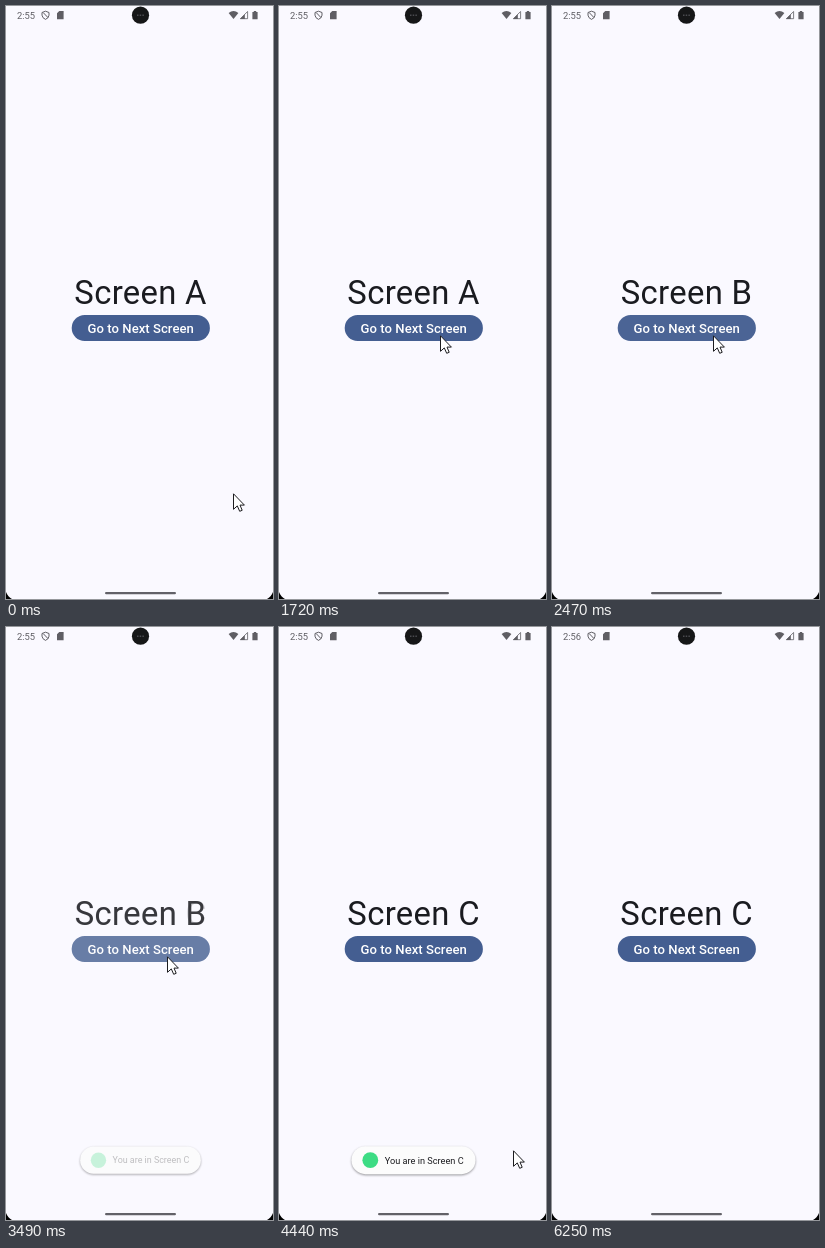
An HTML page that plays this animation: 267x593 px, repeating every 7000 ms.

```html
<!DOCTYPE html>
<html lang="en">
<head>
<meta charset="utf-8">
<title>Screen transitions</title>
<style>
  html, body { margin: 0; width: 100%; height: 100%; overflow: hidden; background: #faf9ff; }
  svg { display: block; width: 100vw; height: 100vh; font-family: Roboto, sans-serif; }
  .title { font-size: 32.8px; letter-spacing: .33px; fill: #1a1b20; text-anchor: middle; }
  .label { font-size: 13.12px; letter-spacing: .03px; font-weight: 500; fill: #fff; text-anchor: middle; }
  .button { x: 65.7px; y: 309px; width: 138.2px; height: 26.1px; rx: 13.05px; }
  #bubble { fill: #fcfcfc; filter: drop-shadow(0 1px 1px rgba(0, 0, 0, .4)); }
</style>
</head>
<body>
<svg viewBox="0 0 267 593">
  <rect width="267" height="593" fill="#faf9ff"/>

  <!-- status bar -->
  <g fill="#5f5e64">
    <text id="clock" x="11" y="12.9" font-size="9.4"></text>
    <path d="M39.5 5.2 L43 6.5 V9.2 Q42.8 12 39.5 13.4 Q36.2 12 36 9.2 V6.5Z M37.2 6.6 L42 11.6" fill="none" stroke="#5f5e64"/>
    <path d="M53.3 5 H57.6 V13.2 H51 V7.3Z"/>
    <path d="M222.6 6.9 Q227.5 3.2 232.4 6.9 L227.5 13Z"/>
    <path d="M234.4 12.7 L241.6 5.5 V12.7Z" fill="none" stroke="#5f5e64" stroke-width=".8"/>
    <path d="M234 13 L238.8 8.2 V13Z"/>
    <path d="M246.4 6 H247.8 V5 H250.2 V6 H251.6 V13.2 H246.4Z"/>
  </g>
  <circle cx="134.5" cy="9.2" r="8.6" fill="#161718"/>
  <path d="M131 9.2 H138" stroke="#4a4b4f" stroke-width="1.5" stroke-dasharray="1.5 1.2"/>

  <g id="screens"></g>

  <g id="toast">
    <rect id="bubble" x="72.5" y="519.2" width="124" height="28" rx="14"/>
    <g id="message">
      <circle cx="91.3" cy="533.2" r="7.9" fill="#3ddc84"/>
      <text x="105.8" y="536.6" font-size="9.18" fill="#1b1b1f">You are in Screen C</text>
    </g>
  </g>

  <!-- navigation handle and display corners -->
  <rect x="99" y="585.9" width="71" height="2.4" rx="1.2" fill="#626168"/>
  <path d="M0 586 Q2 591 6 593 H0Z M267 586 Q265 591 261 593 H267Z"/>

  <path id="cursor" d="M.5 .8 V16.3 L4.3 12.9 L6.7 18.3 L9.2 17.3 L7 12.1 H11.4Z" fill="#fff" stroke="#1c1c1f"/>
</svg>
<script>
const LOOP = 7000, STEP = 150;
const FIRST_PRESS = 2020, SECOND_PRESS = 3340, RELEASE = 3940;
const $ = id => document.getElementById(id);

// Key points of the pointer: time, x, y.
const route = [
  [0, 227, 487], [150, 225, 485], [400, 225, 485], [1150, 172, 362], [1720, 161, 329],
  [3790, 161, 329], [4320, 226, 485], [4440, 234, 523], [4890, 235, 600]
];

// Progress from 0 to 1 that advances in jumps of STEP.
function ramp(t, start, duration) {
  const elapsed = Math.floor((t - start) / STEP) * STEP;
  return Math.min(1, Math.max(0, elapsed / duration));
}
const smooth = p => p * p * (3 - 2 * p);
const crossfade = (t, start) => smooth(ramp(t, start, 600));

function pointer(t) {
  const i = route.findLastIndex(point => point[0] <= t);
  const [start, x, y] = route[i];
  const [end, nextX, nextY] = route[i + 1] || [LOOP, x, y];
  const p = ramp(t, start, end - start);
  return [x + (nextX - x) * p, y + (nextY - y) * p];
}

$('screens').innerHTML = [...'ABC'].map(letter => `<g>
  <text class="title" x="134.6" y="298">Screen ${letter}</text>
  <rect class="button" fill="#445e91"/>
  <rect class="button ripple" fill="#fff"/>
  <text class="label" x="134.7" y="326.8">Go to Next Screen</text>
</g>`).join('');
const screens = [...$('screens').children];
const ripples = document.querySelectorAll('.ripple');

function draw(t) {
  const position = crossfade(t, FIRST_PRESS - STEP) + crossfade(t, SECOND_PRESS);
  const presses = t < RELEASE ? (t >= FIRST_PRESS) + (t >= SECOND_PRESS) : 0;
  const shown = ramp(t, SECOND_PRESS, 450) - ramp(t, 5490, 450);

  screens.forEach((screen, i) => screen.setAttribute('opacity', Math.max(0, 1 - Math.abs(position - i))));
  ripples.forEach(r => r.setAttribute('opacity', presses * .04));
  $('toast').setAttribute('opacity', shown ** .2);
  $('toast').setAttribute('transform', `translate(134.5 533.2) scale(${.96 + .04 * shown}) translate(-134.5 -533.2)`);
  $('message').setAttribute('opacity', shown);
  $('clock').textContent = t < 6250 ? '2:55' : '2:56';
  $('cursor').setAttribute('transform', `translate(${pointer(t).map(Math.round)})`);
}

const start = performance.now();
function tick() {
  draw((performance.now() - start) % LOOP);
  requestAnimationFrame(tick);
}
tick();
</script>
</body>
</html>
```
